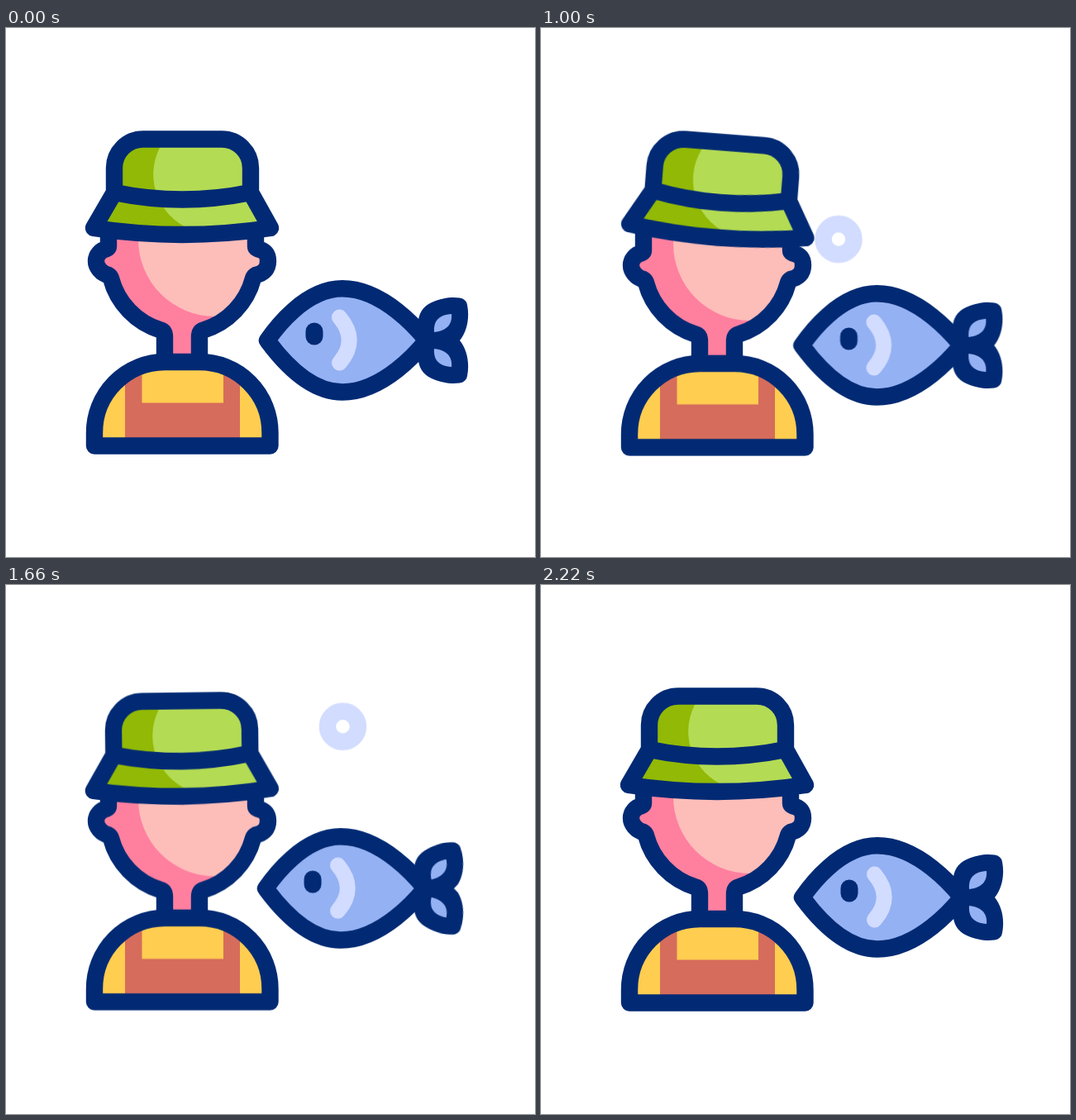
Write an HTML page without scripts that moves like this. It is 640 px wide and 640 px high and loops after 2400 ms.

```html
<!DOCTYPE html>
<html lang="en">
<head>
<meta charset="utf-8">
<title>Angler and fish</title>
<style>
  html, body { margin: 0; width: 100%; height: 100%; overflow: hidden; background: #fff; }
  svg { display: block; width: 100%; height: 100%; }

  .line { stroke: #022a74; stroke-width: 20.4; stroke-linejoin: round; }
  .ink { fill: #022a74; }
  .none { fill: none; }

  .torso, .head, .hat, .tilt, .fish, .fin, .bubble {
    animation: 2.4s ease-in-out infinite both;
  }
  .torso { animation-name: torso; }
  .head { animation-name: head; }
  .hat { animation-name: hat; }
  .tilt { animation-name: tilt; transform-origin: 213px 252px; }
  .fish { animation-name: fish; }
  .fin { animation-name: fin; transform-origin: 512px 378px; }
  .bubble {
    animation-name: bubble;
    animation-timing-function: linear;
    transform-box: fill-box;
    transform-origin: center;
    fill: none;
    stroke: #d2dcff;
    stroke-width: 20.5;
  }
  .late { animation-delay: .46s; }

  @keyframes torso {
    0%, 12.5%, 92.5%, 100% { transform: translateY(0); }
    28.333% { transform: translateY(10px); }
    57.5% { transform: translateY(-9px); }
    80% { transform: translateY(5.5px); }
  }
  @keyframes head {
    0%, 12.5%, 92.5%, 100% { transform: translateY(0); }
    25.833% { transform: translateY(22.3px); }
    55.833% { transform: translateY(-9px); }
    79.167% { transform: translateY(11px); }
  }
  @keyframes hat {
    0%, 12.5%, 92.5%, 100% { transform: translateY(0); }
    24.167% { transform: translateY(30px); animation-timing-function: cubic-bezier(.42, 0, .75, 1); }
    56.667% { transform: translateY(-27px); animation-timing-function: cubic-bezier(.3, 0, .5, 1); }
    76.25% { transform: translateY(13.5px); }
  }
  @keyframes tilt {
    0%, 12.5%, 92.5%, 100% { transform: rotate(0deg); }
    23.333% { transform: rotate(-3.8deg); }
    55.417% { transform: rotate(9.5deg); animation-timing-function: cubic-bezier(.3, 0, .5, 1); }
    76.667% { transform: rotate(-3deg); }
  }
  @keyframes fish {
    0%, 20%, 92.5%, 100% { transform: translate(0, 0); }
    40.833% { transform: translate(-.6px, 6px); }
    67.5% { transform: translate(-2px, -11px); }
  }
  @keyframes fin {
    0%, 15.833%, 40.833%, 62.5%, 85%, 100% { transform: rotate(0deg); }
    30.625%, 51.25%, 74.167% { transform: rotate(-12deg); }
  }
  @keyframes bubble {
    0%, 22.5% { transform: translateY(16.8px) scale(0); }
    29.167% { transform: translateY(4.6px) scale(1); }
    58.333% { transform: translateY(-49px) scale(1); }
    60.833%, 100% { transform: translateY(-53.5px) scale(0); }
  }
</style>
</head>
<body>
<svg viewBox="0 0 640 640">
  <defs>
    <path id="face" d="M124 212V264Q124 266 122 267C114 269 109 275 109 282S115 297 124 299Q126 300 127 303A89.300 89.300 0 0 0 187 365.500Q192 367 192 374V412H234V374Q234 367 239 365.500A89.300 89.300 0 0 0 299 303Q300 300 302 299C311 297 317 292 317 282S312 269 304 267Q302 266 302 264V212"/>
    <g id="lobe">
      <path class="ink" d="M505 385C494 360 497 340 515 332C528 326 540 325 549 326.500Q557 328 558 335C561 350 558 367 549 378L540 385Z"/>
      <path fill="#94b1f3" d="M518 368C517 355 523 347 539 346C540 357 535 366 518 368Z"/>
    </g>
  </defs>

  <circle class="bubble" cx="360" cy="274" r="18.500"/>
  <circle class="bubble late" cx="407.500" cy="205" r="18.500"/>

  <g class="head">
    <use href="#face" fill="#ff7f9f"/>
    <path fill="#fdbdb9" d="M160 212V256A93 93 0 0 0 253 349L256 358A89 89 0 0 0 299 303Q300 300 302 299C311 297 317 292 317 282S312 269 304 267Q302 266 302 264V212Z"/>
    <use href="#face" class="line none"/>
  </g>

  <g class="torso">
    <path fill="#ffcd50" d="M107 505.500V490A85.500 85.500 0 0 1 192 404H234A85.500 85.500 0 0 1 319.500 490V505.500Z"/>
    <path fill="#d66c5c" d="M144 415H164.500V453.500H263V415H283V505H144Z"/>
    <path class="line none" d="M107 505.500V490A85.500 85.500 0 0 1 192 404H234A85.500 85.500 0 0 1 319.500 490V505.500Z"/>
  </g>

  <g class="hat"><g class="tilt">
    <path fill="#91b905" d="M131 199V170A35 35 0 0 1 166 134.500H261A35 35 0 0 1 296 170V199L320 242Q213 258 106 242Z"/>
    <path fill="#b3db53" d="M190 138A71 71 0 0 0 225 244Q270 250 318 242L296 199V170A35 35 0 0 0 261 134.500H190Z"/>
    <path class="line none" d="M131 199V170A35 35 0 0 1 166 134.500H261A35 35 0 0 1 296 170V199L320 242Q213 258 106 242L131 199Q213 216 296 199"/>
  </g></g>

  <g class="fish">
    <g class="fin"><use href="#lobe"/></g>
    <g transform="translate(0 756) scale(1 -1)"><g class="fin"><use href="#lobe"/></g></g>
    <path class="line" fill="#94b1f3" d="M316 378C325 365 361 315.300 407 315.300C457 315.300 500 367 509 378C500 389 457 440.500 407 440.500C361 440.500 325 390 316 378Z"/>
    <rect class="ink" x="362.500" y="356.500" width="21" height="27" rx="10.500"/>
    <path fill="none" stroke="#d2dcff" stroke-width="19" stroke-linecap="round" d="M403.500 350Q427 378 403.500 405"/>
  </g>
</svg>
</body>
</html>
```
